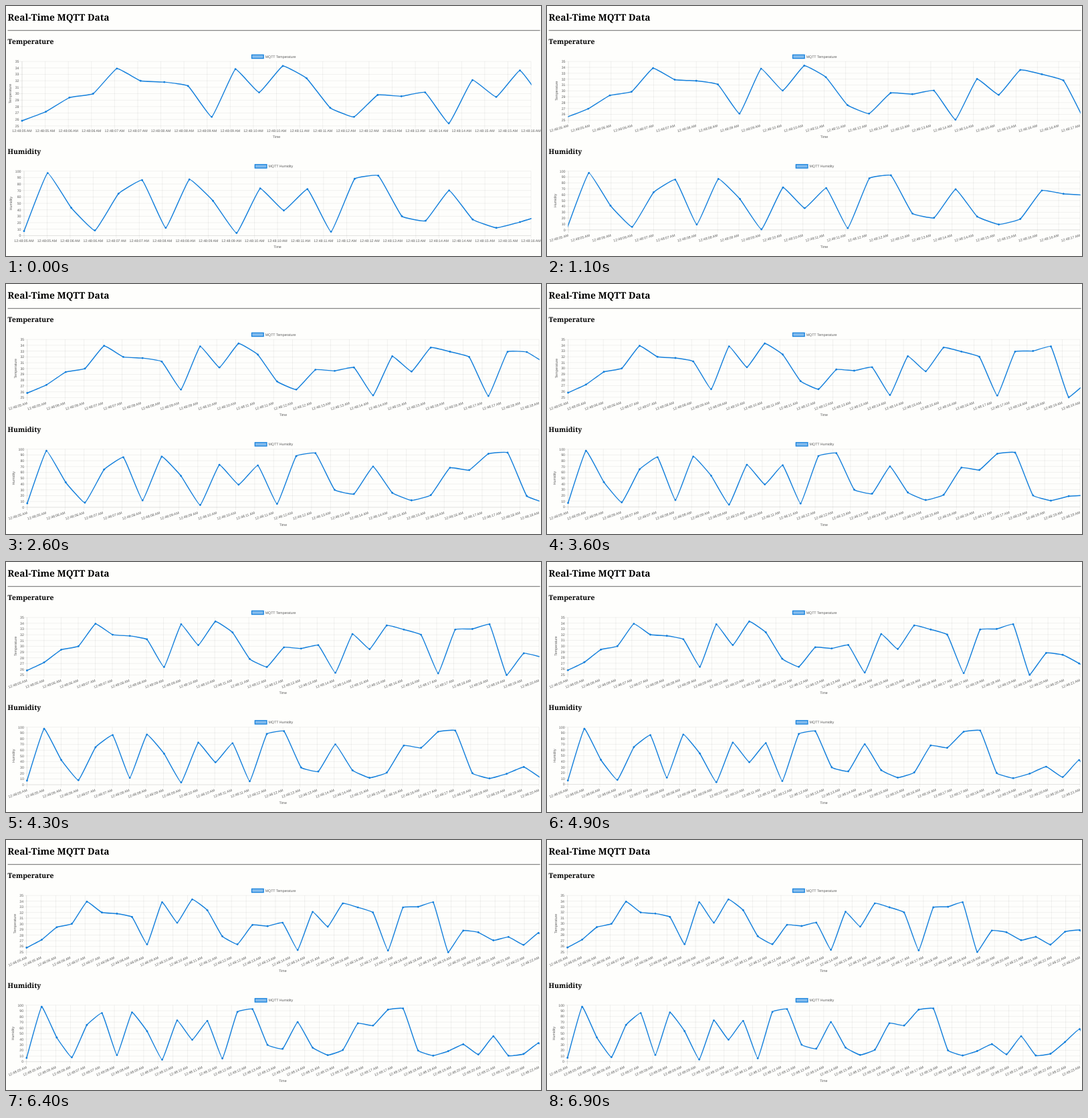
Write an HTML page that moves like this. It is 800 px wide and 375 px high and loops after 7000 ms.

```html
<!DOCTYPE html>
<html lang="en">
<head>
<meta charset="utf-8">
<title>Real-Time MQTT Data</title>
<style>
html, body { margin: 0; width: 100%; height: 100%; overflow: hidden; background: #fefefc; }
svg { display: block; width: 800px; height: 375px; text-rendering: geometricPrecision; }
.head { font-family: "Noto Serif", serif; font-weight: bold; fill: #000; }
.chart text { font: 5.25px "Liberation Sans", Arial, sans-serif; fill: #5c5c5c; }
.mid { text-anchor: middle; }
.end { text-anchor: end; }
.grid { stroke: rgba(0, 0, 0, .075); stroke-width: .75; fill: none; }
.zero { stroke: rgba(0, 0, 0, .16); stroke-width: .75; fill: none; }
.line { stroke: #1580dc; stroke-width: 1.45; fill: none; stroke-linejoin: round; }
.dots { fill: #1580dc; }
.key { fill: #82bbed; stroke: #1580dc; stroke-width: 1.3; }
</style>
</head>
<body>
<svg viewBox="0 0 800 375">
  <g class="head">
    <text x="2.6" y="22.3" font-size="13.8">Real-Time MQTT Data</text>
    <text x="2.6" y="57.2" font-size="10.35">Temperature</text>
    <text x="2.6" y="221.7" font-size="10.35">Humidity</text>
  </g>
  <path d="M2.6 36.7H798.6" stroke="#6a6a6a" stroke-width="1"/>
  <g id="temperature" class="chart"></g>
  <g id="humidity" class="chart"></g>
</svg>
<script>
const LOOP = 7000, FRAME = 100;
const FIRST = 22, LAST = 37;          // number of samples on the chart
const BEGIN = -150, STEP = 502;       // when sample 23 arrives, and the gap between samples
const DURATION = 1000, TENSION = 0.1;

const charts = [
  { id: 'temperature', name: 'Temperature', dy: 0, min: 25, max: 35, step: 1, inset: 24, title: 17.6, keyX: 367.5,
    data: [25.8, 27.2, 29.4, 30, 33.9, 32, 31.8, 31.2, 26.4, 33.8, 30.2, 34.3, 32.4, 27.8, 26.4, 29.8, 29.6, 30.2, 25.4,
      32.1, 29.5, 33.6, 32.9, 32, 25.3, 32.9, 33, 33.8, 25, 28.8, 28.5, 27.1, 27.7, 26.3, 28.6, 29.1, 28] },
  { id: 'humidity', name: 'Humidity', dy: 164.5, min: 0, max: 100, step: 10, inset: 27, title: 20.2, keyX: 372.3,
    data: [7, 97, 43, 8, 65, 86, 12, 87, 54, 4, 73, 39, 72, 6, 88, 93, 30, 23, 70,
      25, 12, 21, 68, 64, 92, 94, 20, 11, 19, 31, 13, 45, 11, 14, 35, 61, 50] }
];

const f = v => v.toFixed(2);
const ease = p => 1 - (1 - Math.min(1, Math.max(0, p))) ** 4;
const mix = (a, b, k) => ({ x: a.x + (b.x - a.x) * k, y: a.y + (b.y - a.y) * k });
const clamp = (v, lo, hi) => Math.min(hi, Math.max(lo, v));
const text = (x, y, s, cls, extra = '') =>
  `<text x="${f(x)}" y="${f(y + 1.87)}" class="${cls}" ${extra}>${s}</text>`;

// Plot area; time labels tilt once they no longer fit side by side.
function layout(c, n) {
  const top = 83.2 + c.dy;
  if (n < 25) return { left: c.inset, right: 785, top, bottom: 179.9 + c.dy, angle: 0 };
  const angle = Math.asin(8.77 * (n - 1) / 766);
  return {
    left: 3.2 + 30 * Math.cos(angle), right: 797, top, angle,
    bottom: 185 - 28 * Math.sin(angle) - 6.2 * Math.cos(angle) + c.dy
  };
}

function target(c, n, i) {
  const a = layout(c, n);
  return {
    x: a.left + (a.right - a.left) * i / (n - 1),
    y: a.bottom - (a.bottom - a.top) * (c.data[i] - c.min) / (c.max - c.min)
  };
}

const pose = (c, n, p) => c.starts[n].map((s, i) => mix(s, target(c, n, i), ease(p)));

// Each update sets out from wherever the previous one had got to.
for (const c of charts) {
  c.starts = { [FIRST]: c.data.slice(0, FIRST).map((_, i) => target(c, FIRST, i)) };
  for (let n = FIRST + 1; n <= LAST; n++) {
    const fresh = { x: target(c, n - 1, n - 1).x, y: layout(c, n - 1).bottom };
    c.starts[n] = [...pose(c, n - 1, STEP / DURATION), fresh];
  }
}

function curve(pts, a) {
  const ctrl = pts.map((p, i) => {
    const u = pts[i - 1] || p, v = pts[i + 1] || p;
    const d1 = Math.hypot(p.x - u.x, p.y - u.y), d2 = Math.hypot(v.x - p.x, v.y - p.y);
    const at = k => `${f(p.x + k * (v.x - u.x))} ${f(clamp(p.y + k * (v.y - u.y), a.top, a.bottom))}`;
    return { before: at(-TENSION * d1 / (d1 + d2)), after: at(TENSION * d2 / (d1 + d2)) };
  });
  return pts.map((p, i) => i
    ? `C${ctrl[i - 1].after} ${ctrl[i].before} ${f(p.x)} ${f(p.y)}`
    : `M${f(p.x)} ${f(p.y)}`).join('');
}

function draw(c, n, p) {
  const a = layout(c, n), midX = (a.left + a.right) / 2, midY = (a.top + a.bottom) / 2;
  let grid = '', zero = `M${f(a.left)} ${f(a.top)}V${f(a.bottom + 4.3)}`, labels = '';

  for (let v = c.min; v <= c.max; v += c.step) {
    const y = a.bottom - (a.bottom - a.top) * (v - c.min) / (c.max - c.min);
    const row = `M${f(a.left - 4.3)} ${f(y)}H${f(a.right)}`;
    if (v === 0) zero += row; else grid += row;
    labels += text(a.left - 4.5, y, v, 'end');
  }
  for (let i = 0; i < n; i++) {
    const x = a.left + (a.right - a.left) * i / (n - 1);
    if (i) grid += `M${f(x)} ${f(a.top)}V${f(a.bottom + 4.3)}`;
    const time = `12:48:${String(5 + (i >> 1)).padStart(2, '0')} AM`;
    const y = a.bottom + (a.angle ? 8 : 7.3);
    labels += a.angle
      ? text(x, y, time, 'end', `transform="rotate(${f(-a.angle * 180 / Math.PI)} ${f(x)} ${f(y)})"`)
      : text(x, y, time, 'mid');
  }
  const tx = a.left - c.title;
  labels += text(tx, midY, c.name, 'mid', `transform="rotate(-90 ${f(tx)} ${f(midY)})"`);
  labels += text(midX, 196.5 + c.dy, 'Time', 'mid');
  labels += text(c.keyX + 20.2, 75.9 + c.dy, 'MQTT ' + c.name, '');

  const pts = pose(c, n, p);
  const dots = pts.filter(q => q.x > a.left - .6 && q.x < a.right + .6 && q.y < a.bottom + .6)
    .map(q => `<circle cx="${f(q.x)}" cy="${f(q.y)}" r="1.45"/>`).join('');
  const clip = 'clip-' + c.id;

  document.getElementById(c.id).innerHTML =
    `<clipPath id="${clip}"><rect x="${f(a.left - .7)}" y="${f(a.top - .7)}" ` +
    `width="${f(a.right - a.left + 1.4)}" height="${f(a.bottom - a.top + 1.4)}"/></clipPath>` +
    `<path class="grid" d="${grid}"/><path class="zero" d="${zero}"/>${labels}` +
    `<rect class="key" x="${c.keyX}" y="${73.3 + c.dy}" width="17.6" height="5.3"/>` +
    `<path class="line" clip-path="url(#${clip})" d="${curve(pts, a)}"/><g class="dots">${dots}</g>`;
}

function render(t) {
  const k = Math.min(LAST - 23, Math.floor((t - BEGIN) / STEP));
  const p = (t - BEGIN - k * STEP) / DURATION;
  for (const c of charts) draw(c, 23 + k, p);
}

let shown = -1;
function tick() {
  const t = Math.floor(performance.now() % LOOP / FRAME) * FRAME;
  if (t !== shown) render(shown = t);
  requestAnimationFrame(tick);
}
tick();
</script>
</body>
</html>
```
